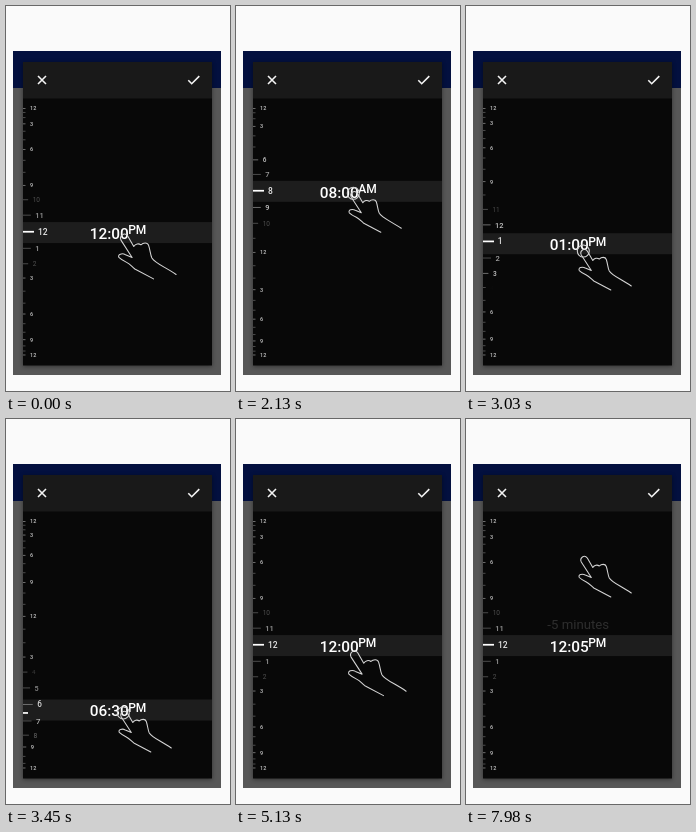
Recreate the animation shown at these times as an HTML page. Size 224 by 385 pixels, loop 8 s.

```html
<!DOCTYPE html>
<html lang="en">
<head>
<meta charset="utf-8">
<title>Time picker</title>
<style>
  html, body { margin: 0; width: 100%; height: 100%; overflow: hidden; background: #fafafa; }
  svg { display: block; width: 100vw; height: 100vh; }
  text { font-family: Roboto, "Liberation Sans", sans-serif; fill: #fff; }
  .line { fill: none; stroke: #f4f4f4; stroke-width: 1.6; }
  .shadow { filter: drop-shadow(0 1px 2px rgba(0, 0, 0, .45)); }
  #scale text { fill: #e6e6e6; }
  #time, #half { font-weight: 500; }
  #hand { fill: none; stroke: #d4d4d4; stroke-width: 1.05; stroke-linejoin: round; stroke-linecap: round; }
</style>
</head>
<body>
<svg viewBox="0 0 224 385">
  <rect x="7" y="45" width="208" height="324" fill="#575757"/>
  <rect x="7" y="45" width="208" height="37" fill="#03103f"/>
  <rect class="shadow" x="17" y="56" width="189" height="303.5" fill="#080808"/>
  <rect x="17" y="56" width="189" height="36.5" fill="#191919"/>
  <path class="line" d="M32 70l8 8m0-8l-8 8"/>
  <path class="line" d="M182.3 74.3l3.4 3.4 7.6-7.6"/>
  <rect id="band" x="17" width="189" height="21" fill="#1d1d1d"/>
  <g id="scale"></g>
  <rect id="mark" x="17" height="1.7" fill="#fff"/>
  <text id="time" x="83.8" font-size="15.4"></text>
  <text id="half" x="122.2" font-size="12"></text>
  <text id="plus" x="112.2" y="251.6" font-size="13.2" text-anchor="middle">+5 minutes</text>
  <text id="minus" x="112.2" y="209.6" font-size="13.2" text-anchor="middle">-5 minutes</text>
  <g id="hand">
    <path id="palm" vector-effect="non-scaling-stroke" d="M27.5 39L10.5 30C7 27 6 25.5 3 24C0 22.5-2 21.5-4 19.5C-5.5 16.5-1 15.3 2 17L8 19.5L-2 4C-4 0 1-4 4 0L9.5 9.5C11 7 14 6.5 16 8C18 6 22 5.5 23 8.5C24.5 13 24.5 17 26 20C29 25 38 28 48 35"/>
    <circle id="touch" r="6"/>
  </g>
</svg>
<script>
const LOOP = 8000, TOP = 102.5, STEP = 10.27, HOURS = 24, REST = 230;
const $ = id => document.getElementById(id);
const set = (el, attrs) => { for (const k in attrs) el.setAttribute(k, attrs[k]); };
const add = name => $('scale').appendChild(document.createElementNS('http://www.w3.org/2000/svg', name));

const part = (t, from, to) => Math.min(1, Math.max(0, (t - from) / (to - from)));
const mix = (a, b, p) => a + (b - a) * p;
const easeOut = p => 1 - (1 - p) ** 2;
const easeBoth = p => p < .5 ? 2 * p * p : 1 - 2 * (1 - p) ** 2;

const marks = Array.from({ length: HOURS + 1 }, (_, hour) => {
  const tick = add('rect'), label = add('text');
  set(tick, { x: 17, height: 1, fill: '#777' });
  label.textContent = hour % 12 || 12;
  return { hour, tick, label };
});

function hourAt(t) {
  if (t < 2595) return mix(12, 6, easeOut(part(t, 1800, 2580)));
  if (t < 3405) return mix(6, 18.3, easeBoth(part(t, 2610, 3390)));
  return mix(18.3, 12, easeBoth(part(t, 3420, 4170)));
}

const baseY = h => TOP + STEP * h;

// Hours spread out around the focus and crowd towards both ends.
function lensY(hour, focus) {
  const span = hour < focus ? -focus : HOURS - focus;
  const p = span ? (hour - focus) / span : 0;
  return baseY(focus) + STEP * span * (1.67 * p - .67 * p * p);
}

function drawScale(h, snapped) {
  for (const { hour, tick, label } of marks) {
    const y = lensY(hour, h), d = Math.abs(hour - h);
    const near = Math.max(0, 1 - d / 3), size = 5.5 + 3 * near;
    const major = hour % 3 === 0;
    set(tick, { y: y - .5, width: 2.5 + 8 * near, opacity: major ? .9 : .6 });
    set(label, {
      x: 24 + 8 * near, y: y + size * .36, 'font-size': size,
      'font-weight': major || d < 1.5 ? 500 : 400,
      opacity: Math.max(major ? .85 : 0, 1 - .34 * d)
    });
  }
  set($('mark'), { y: lensY(snapped, h) - .85, width: snapped % 1 ? 5 : 11 });
}

function drawTime(h, snapped, minutes) {
  const y = baseY(h) + .8, pad = n => String(n).padStart(2, '0');
  set($('band'), { y: y - 10.5 });
  $('time').textContent = pad(Math.floor(snapped) % 12 || 12) + ':' + pad(snapped % 1 * 60 + minutes);
  $('half').textContent = snapped < 12 ? 'AM' : 'PM';
  set($('time'), { y: y + 6.2 });
  set($('half'), { y: y + 1.9 });
}

function drawHand(t) {
  const enter = t < 30 ? 1 : part(t, 30, 510);
  let y = REST + 42 * (1 - easeOut(enter));
  if (t >= 1800 && t < 4440) y = baseY(hourAt(t + 14)) + 4;
  else if (t >= 810 && t < 5010) y = baseY(12) + 4;
  if (t >= 5010) y = mix(REST, 271, easeBoth(part(t, 5010, 5580)));
  if (t >= 6780) y = mix(271, 139, easeBoth(part(t, 6780, 7380)));

  const down = part(t, 810, 1140) - part(t, 4440, 4740)
    + part(t, 5970, 6210) - part(t, 6300, 6500) + part(t, 7680, 7980);
  const touch = part(t, 1140, 1470) - part(t, 4440, 4740)
    + part(t, 6150, 6300) - part(t, 6540, 6750);
  set($('hand'), { transform: `translate(117.3 ${y})`, opacity: enter });
  set($('palm'), { transform: `scale(${1.1 - .1 * down})` });
  set($('touch'), { opacity: touch });
}

function draw(t) {
  const h = hourAt(t), snapped = Math.round(h * 2) / 2;
  drawScale(h, snapped);
  drawTime(h, snapped, t >= 6300 ? 5 : 0);
  set($('plus'), { opacity: part(t, 6240, 6480) - part(t, 6780, 7110) });
  set($('minus'), { opacity: .15 * part(t, 7830, 7980) });
  drawHand(t);
}

const start = performance.now();
function frame() {
  draw((performance.now() - start) % LOOP);
  requestAnimationFrame(frame);
}
frame();
</script>
</body>
</html>
```
